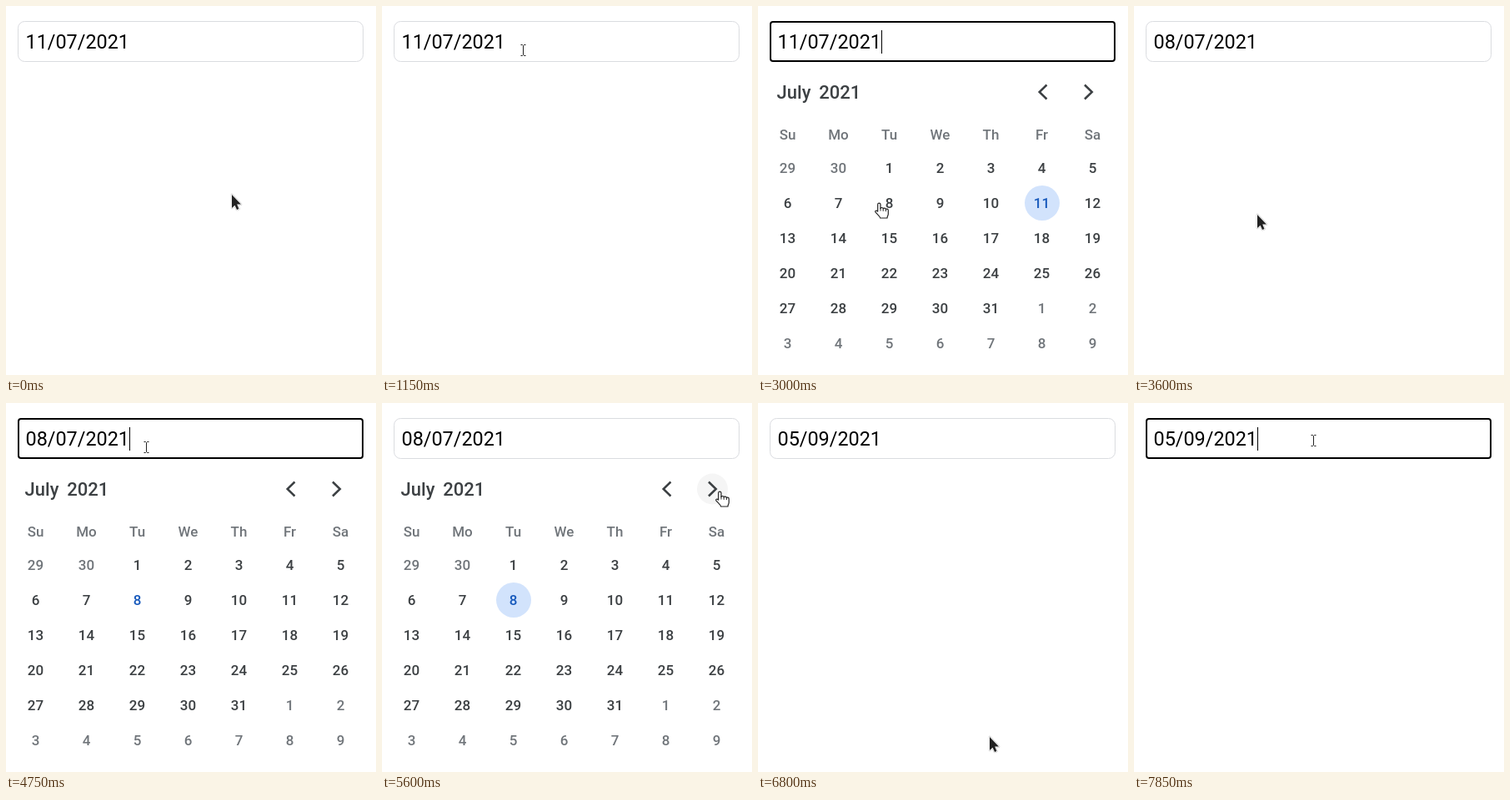
An HTML page with a canvas that plays this animation: 444x442 px, repeating every 8000 ms.

```html
<!DOCTYPE html>
<html lang="en">
<head>
<meta charset="utf-8">
<title>Date picker</title>
<style>
  html, body { margin: 0; width: 100%; height: 100%; overflow: hidden; background: #fff; }
  canvas { display: block; }
</style>
</head>
<body>
<canvas id="stage" width="444" height="442"></canvas>
<script>
const ctx = document.getElementById('stage').getContext('2d');
const LOOP = 8000, STEP = 50;
const INK = '#3c4043', MUTED = '#70757a', BLUE = '#185abc';
const WEEKDAYS = ['Su', 'Mo', 'Tu', 'We', 'Th', 'Fr', 'Sa'];
const JULY = { name: 'July', lead: 2, before: 30, days: 31 };
const AUGUST = { name: 'August', lead: 4, before: 31, days: 31 };
const BUTTONS = [{ x: 342, dir: -1 }, { x: 396.5, dir: 1 }];
const BUTTON_Y = 103;

// Pointer path: time, x, y
const PATH = [
  [0, 271, 226], [400, 228, 230], [550, 228, 230], [1250, 166, 43],
  [2000, 166, 43], [2250, 167, 63], [2700, 150, 218], [2850, 146, 189],
  [2900, 146, 189], [3050, 145, 253], [3150, 148, 250], [3800, 148, 250],
  [4450, 168, 53], [4850, 168, 53], [5550, 405, 106], [5900, 405, 106],
  [6550, 278, 397], [6600, 279, 402], [6650, 278, 400], [6950, 278, 400],
  [7000, 279, 398], [7100, 279, 398], [7800, 215, 45]
];

// Times: focus, blur, calendar open, calendar close
const SESSIONS = [
  { focus: 1550, blur: 3350, open: 1750, close: 3550 },
  { focus: 4600, blur: 5600, open: 4750, close: 6750 },
  { focus: 7850, blur: LOOP, open: LOOP, close: LOOP }
];

const ARROW = new Path2D('M0 0V16L3.6 12.7L6 18L8.5 17L6.2 11.6H11Z');
const HAND = new Path2D('M-1.8 9.5V1.2C-1.8 -.8 1.5 -.8 1.5 1.2V6C1.6 4.6 4.6 4.7 4.7 6.3' +
  'C5 5.2 7.7 5.4 7.9 7C8.4 6.2 10.8 6.4 10.8 8.3V12.5C10.8 14.5 9.6 15 9.5 17.5H1.2' +
  'C1 15.5 -2 13.5 -4.6 10.3C-5.4 8.8 -3.6 7.9 -1.8 9.5Z');
const KNUCKLES = new Path2D('M1.5 5.5V9M4.7 6.3V9.3M7.9 7V9.6');
const BEAM = new Path2D('M-3 -6.5H-1L0 -5.5L1 -6.5H3M0 -5.5V5.5M-3 6.5H-1L0 5.5L1 6.5H3');

const colX = i => 35.5 + 61 * i;
const rowY = i => 194 + 42 * i;
const ease = p => p * p * (3 - 2 * p);

function pointerAt(t) {
  const i = PATH.findIndex(k => k[0] > t);
  if (i < 0) return PATH[PATH.length - 1].slice(1);
  const [t0, x0, y0] = PATH[i - 1], [t1, x1, y1] = PATH[i];
  const p = ease((t - t0) / (t1 - t0));
  return [Math.round(x0 + (x1 - x0) * p), Math.round(y0 + (y1 - y0) * p)];
}

function text(str, x, y, size, color, weight = 500, align = 'center') {
  ctx.font = `${weight} ${size}px Roboto, sans-serif`;
  ctx.textAlign = align;
  ctx.fillStyle = color;
  ctx.fillText(str, x, y);
}

function disc(x, y, r, color) {
  ctx.fillStyle = color;
  ctx.beginPath();
  ctx.arc(x, y, r, 0, Math.PI * 2);
  ctx.fill();
}

function stroke(path, width, color) {
  ctx.lineWidth = width;
  ctx.strokeStyle = color;
  ctx.stroke(path);
}

function drawInput(t, value, session) {
  const focused = session && t < session.blur;
  const box = new Path2D();
  if (focused) box.roundRect(15, 19, 413, 47, 3);
  else box.roundRect(14.5, 18.5, 414, 48, 8);
  stroke(box, focused ? 2 : 1, focused ? '#000' : '#dadce0');
  text(value, 23.5, 51, 23.4, '#000', 400, 'left');
  if (!focused) return;
  const age = t - session.focus;
  if (age < 500 || age >= 1000) {
    ctx.fillStyle = '#000';
    ctx.fillRect(148, 29, 1, 28);
  }
}

function drawHeader(month, x, y) {
  text(month.name, 22.6, 111, 22, INK, 500, 'left');
  text('2021', 32.4 + ctx.measureText(month.name).width, 111, 22, INK, 500, 'left');
  for (const b of BUTTONS) {
    if (Math.hypot(x - b.x, y - BUTTON_Y) < 18.5) disc(b.x, BUTTON_Y, 18.5, '#f5f5f5');
    const back = b.x - 4.5 * b.dir, tip = b.x + 4.3 * b.dir;
    stroke(new Path2D(`M${back} 94.5L${tip} 103L${back} 111.5`), 2.5, INK);
  }
}

function drawCalendar(t, month, picked, session, x, y) {
  ctx.globalAlpha = t >= session.close ? 0.4 : 1;
  drawHeader(month, x, y);
  WEEKDAYS.forEach((d, i) => text(d, colX(i), 160, 17, MUTED));
  for (let i = 0; i < 42; i++) {
    const n = i - month.lead + 1;
    const inside = n >= 1 && n <= month.days;
    const label = n < 1 ? n + month.before : inside ? n : n - month.days;
    const cx = colX(i % 7), cy = rowY(Math.floor(i / 7));
    const chosen = inside && n === picked;
    if (chosen) {
      const full = ctx.globalAlpha;
      ctx.globalAlpha = full * Math.min(1, (t - session.open) / 100);
      disc(cx + 0.5, cy, 21, '#d2e3fc');
      ctx.globalAlpha = full;
    }
    text(label, cx, cy + 6, 17, chosen ? BLUE : inside ? INK : MUTED);
  }
  ctx.globalAlpha = 1;
}

function pointerKind(x, y, calendarOpen) {
  if (y >= 18 && y <= 67 && x >= 14 && x <= 429) return 'beam';
  if (!calendarOpen) return 'arrow';
  const onButton = BUTTONS.some(b => Math.hypot(x - b.x, y - BUTTON_Y) < 18.5);
  const col = Math.round((x - colX(0)) / 61);
  const onDay = y > 173 && y < 425 && Math.abs(x - colX(col)) < 21;
  return onButton || onDay ? 'hand' : 'arrow';
}

function drawPointer(kind, x, y) {
  ctx.save();
  ctx.lineJoin = 'round';
  if (kind === 'beam') {
    ctx.translate(x + 0.5, y);
    stroke(BEAM, 2.6, '#fff');
    stroke(BEAM, 1, '#222');
  } else if (kind === 'hand') {
    ctx.translate(x + 0.5, y + 0.5);
    ctx.fillStyle = '#fff';
    ctx.fill(HAND);
    stroke(HAND, 1.2, '#222');
    stroke(KNUCKLES, 1, '#222');
  } else {
    ctx.translate(x, y);
    stroke(ARROW, 2.6, '#c8c8c8');
    stroke(ARROW, 1.6, '#fff');
    ctx.fillStyle = '#222';
    ctx.fill(ARROW);
  }
  ctx.restore();
}

function draw(t) {
  ctx.fillStyle = '#fff';
  ctx.fillRect(0, 0, 444, 442);
  const value = t < 3550 ? '11/07/2021' : t < 6750 ? '08/07/2021' : '05/09/2021';
  const [x, y] = pointerAt(t);
  const session = SESSIONS.filter(s => t >= s.focus).pop();
  const open = session && t >= session.open && t < session.close + STEP;
  drawInput(t, value, session);
  if (open) {
    const month = t < 5750 ? JULY : AUGUST;
    const picked = t < 3600 ? 11 : month === JULY ? 8 : 0;
    drawCalendar(t, month, picked, session, x, y);
  }
  drawPointer(pointerKind(x, y, open), x, y);
}

const start = performance.now();
function tick() {
  const t = (performance.now() - start) % LOOP;
  draw(Math.floor(t / STEP) * STEP);
  requestAnimationFrame(tick);
}
tick();
</script>
</body>
</html>
```
